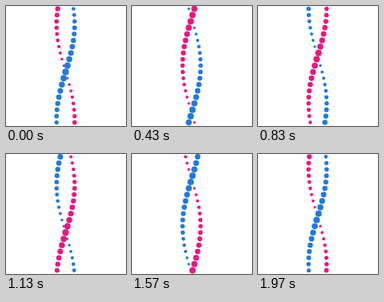
Animation of 150x150 px, one loop 2010 ms. Source, as an HTML page with a canvas:

```html
<!DOCTYPE html>
<html lang="en">
<head>
<meta charset="utf-8">
<title>Double helix loader</title>
<style>
  html, body { margin: 0; width: 100%; height: 100%; overflow: hidden; background: #fff; }
  canvas { display: block; }
</style>
</head>
<body>
<canvas></canvas>
<script>
const SIZE = 150, ROWS = 19, CENTER = 74.5, SWING = 11.3;
const LOOP = 2010, STEPS = 60, ROWS_PER_TURN = 30;
const R_MIN = 1.4, R_MAX = 4.1;
const STRANDS = [
  { color: '#e8187f', offset: 0.5 },
  { color: '#207ade', offset: 0 }
];

const canvas = document.querySelector('canvas');
const ctx = canvas.getContext('2d');
const ratio = window.devicePixelRatio || 1;
canvas.width = canvas.height = SIZE * ratio;
canvas.style.width = canvas.style.height = SIZE + 'px';
ctx.scale(ratio, ratio);

// One dot; turn 0 is nearest to the viewer, turn 0.5 farthest away.
function dotAt(row, strand, phase) {
  const turn = phase - (row - 10) / ROWS_PER_TURN + strand.offset;
  const depth = 2 * Math.abs(turn - Math.round(turn));
  return {
    x: CENTER + SWING * Math.sin(2 * Math.PI * turn),
    y: CENTER + (row - (ROWS - 1) / 2) * SIZE / ROWS,
    r: R_MAX - (R_MAX - R_MIN) * depth,
    color: strand.color
  };
}

function draw(now) {
  // 30 steps per second, the last one held until the loop ends
  const step = Math.min(STEPS - 1, Math.floor((now % LOOP + 3.34) * 0.03));
  const dots = [];
  for (let row = 0; row < ROWS; row++)
    for (const strand of STRANDS) dots.push(dotAt(row, strand, step / STEPS));
  dots.sort((a, b) => a.r - b.r);

  ctx.fillStyle = '#fff';
  ctx.fillRect(0, 0, SIZE, SIZE);
  for (const { x, y, r, color } of dots) {
    ctx.fillStyle = color;
    ctx.beginPath();
    ctx.arc(x, y, r, 0, 2 * Math.PI);
    ctx.fill();
  }
}

function tick() {
  draw(performance.now());
  requestAnimationFrame(tick);
}
tick();
</script>
</body>
</html>
```
